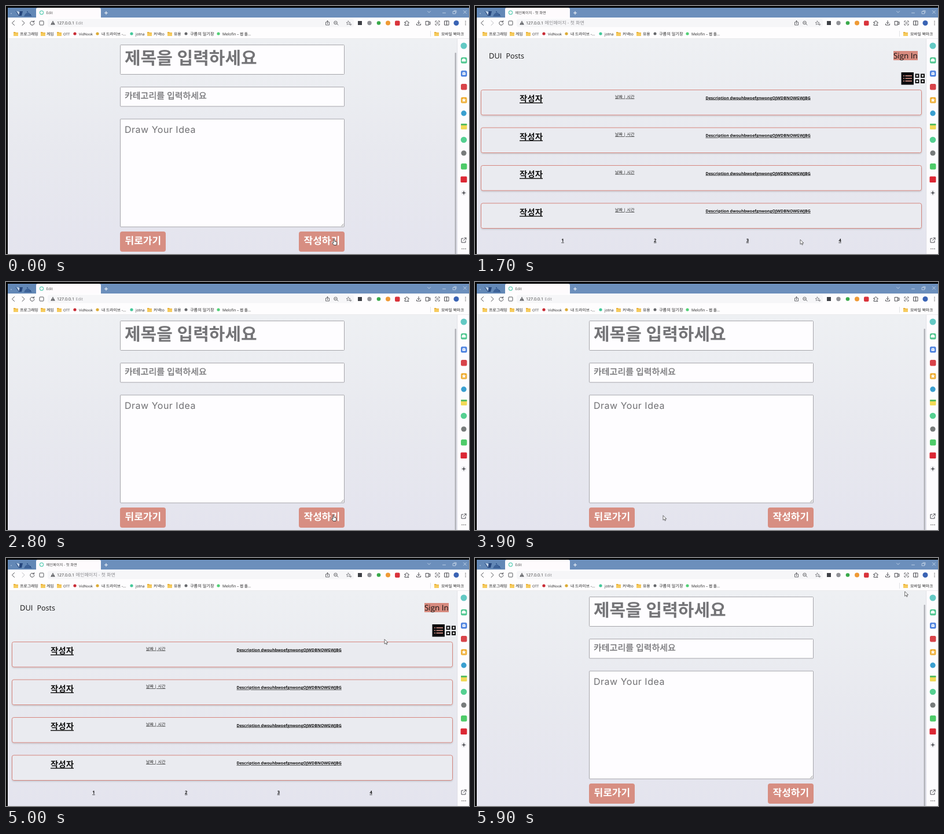
Write an HTML page that moves like this. It is 800 px wide and 430 px high and loops after 6 s.

```html
<!DOCTYPE html>
<html lang="ko">
<head>
<meta charset="utf-8">
<title>Edit</title>
<style>
html, body { margin: 0; width: 100%; height: 100%; overflow: hidden; background: #000; }
svg { display: block; width: 800px; height: 430px; }
text { font-family: "Open Sans", "Noto Sans CJK KR", "Noto Sans CJK", sans-serif; white-space: pre; text-rendering: geometricPrecision; }
.u { text-decoration: underline; }
.i { fill: none; stroke: #4a4b50; stroke-width: 1; stroke-linecap: round; stroke-linejoin: round; }
</style>
</head>
<body>
<svg id="stage" viewBox="0 0 800 430" xmlns="http://www.w3.org/2000/svg"></svg>
<script>
const rect = (x, y, w, h, fill, more = '') =>
  `<rect x="${x}" y="${y}" width="${w}" height="${h}" fill="${fill}" ${more}/>`;
const dot = (x, y, r, fill, more = '') => `<circle cx="${x}" cy="${y}" r="${r}" fill="${fill}" ${more}/>`;
const line = (d, more = '') => `<path class="i" d="${d}" ${more}/>`;
const text = (x, y, size, str, fill = '#222', more = '') =>
  `<text x="${x}" y="${y}" font-size="${size}" fill="${fill}" ${more}>${str}</text>`;
const folder = x => `<path d="M${x} 45h3l1 1h4v6h-8z" fill="#e9b23c"/>` + rect(x, 47, 8, 5, '#f6cb5e', 'rx=".6"');

const defs = `<defs>
  <linearGradient id="bg" x2="0" y2="1"><stop stop-color="#eef0f3"/><stop offset=".5" stop-color="#e8e9ef"/><stop offset="1" stop-color="#e4e4ee"/></linearGradient>
  <linearGradient id="fade"><stop offset=".88" stop-color="#555"/><stop offset="1" stop-color="#555" stop-opacity=".2"/></linearGradient>
  <clipPath id="tabClip"><rect x="68" y="3" width="91" height="17"/></clipPath>
  <filter id="soft" x="-2%" y="-10%" width="104%" height="140%"><feDropShadow dx="0" dy="1.5" stdDeviation="1.3" flood-opacity=".15"/></filter>
</defs>`;

function titleBar() {
  return rect(3, 3, 797, 18, '#6c8fbc') + rect(3, 3, 49, 17, '#6388b6') +
    '<path d="M16 8l6 5 1-4 6 0-2 8-5 0z" fill="#26477d"/><path d="M18 9l4.500 7 1-6z" fill="#c4d6ea"/>' +
    '<path d="M33 14q5-5 8-1l4 5h-14z" fill="#3d6298"/>' +
    dot(9, 13, .8, '#c8d8eb') + dot(37, 10, .9, '#284a80') + dot(42, 15, 1, '#284a80') +
    '<path d="M52 20V6q0-3 3-3h106q3 0 3 3v14z" fill="#fefbfd"/>' +
    line('M170.500 12h5M173 9.500v5', 'style="stroke:#fff"') +
    `<g opacity=".85">${line('M728.500 9l2.500 2.500 2.500-2.500M754.500 12h5M772.500 9.500h4v4h-4zM774 8h4v4M790.500 8l5 5m0-5l-5 5', 'style="stroke:#d5e1ee;stroke-width:.9"')}</g>`;
}

function toolbar() {
  return rect(3, 20, 797, 37, '#fefdfe') + rect(72, 22.500, 529, 14, '#f6f6f8', 'rx="3"') +
    line('M14.500 25.500l-4 4 4 4') +
    rect(58, 26, 7, 7, 'none', 'rx="1" stroke="#55565b"') +
    '<path d="M81 25.500l3.800 7h-7.600z" fill="#55565b"/>' + line('M81 28v2M81 31.200v.2', 'style="stroke:#fff;stroke-width:.8"') +
    text(88, 32.300, 7.1, '127.0.0.1', '#333') +
    line('M554 28h-1.500v5h6v-5H557M555.500 31v-5.500m-1.500 1.500l1.500-1.500 1.500 1.500', 'style="stroke-width:.8"') +
    line('M572 31l2 2M568.200 29h2.600', 'style="stroke-width:.8"') + dot(569.500, 29, 2.800, 'none', 'stroke="#4a4b50" stroke-width=".8"') +
    line('M591.500 26l1 2.300 2.500.2-1.900 1.600.6 2.400-2.200-1.300-2.200 1.300.6-2.400-1.900-1.600 2.500-.2zM594 32h3M595.500 30.500v3', 'style="stroke:#77787d;stroke-width:.8"') +
    rect(608, 26, 7, 7, '#3e4046') + dot(628, 29.500, 3.700, '#929398') + dot(644, 29.500, 3.300, '#39a94a') +
    dot(660, 29.500, 4, '#ef9a35') + rect(672, 25.500, 8.500, 8.500, '#d9333b', 'rx="2"') +
    line('M689 28h2q0-2.500 1.500-2.500T694 28h2v2q-2 0-2 1.500t2 1.500v.5h-7v-2q2 0 2-1.300t-2-1.200z', 'style="stroke-width:.9"') +
    line('M713 25.500v5m-2-2l2 2 2-2M709.500 31v2h7v-2') +
    line('M725.500 26.500h5v6.500h-5zM730.500 28.500l2.500-1v4.500l-2.500-1') +
    line('M742 28v-2h2M747 26h2v2M749 31v2h-2M744 33h-2v-2', 'style="stroke-width:.9"') + dot(745.500, 29.500, 1.500, 'none', 'stroke="#4a4b50" stroke-width=".8"') +
    line('M758 26h7v7h-7zM761.500 26v7') + dot(778, 29.500, 4.500, '#3a63b4') +
    [26.500, 29.500, 32.500].map(y => dot(794, y, .75, '#444')).join('');
}

function bookmarks() {
  const label = (x, size, s) => text(x, 50.500, size, s, '#222');
  return [13, 60, 88, 244, 279, 740].map(folder).join('') +
    label(24, 6.9, '프로그래밍') + label(70, 6.9, '게임') + label(99, 6, 'OTT') +
    dot(119, 48, 2.600, '#c92b35') + label(126, 6.1, 'VidNook') +
    dot(158, 48, 2.600, '#dcab35') + label(165, 6.8, '내 드라이브 -...') +
    dot(217, 48, 2.600, '#45c99a') + label(224, 6.5, 'jotna') +
    label(255, 6.7, '커넥to') + label(290, 6.8, '유용') +
    dot(311, 48, 2.500, '#66676b') + label(318, 7.2, '구름의 일기장') +
    dot(367, 48, 2.600, '#52d076') + label(374, 6.6, 'Melofin – 웹 플...') +
    rect(733, 43, .8, 10, '#dadade') + label(752, 6.8, '모바일 북마크') + rect(3, 56, 797, .7, '#e2e2e6');
}

function sidebar() {
  const tile = (y, c) => rect(786, y - 5, 10.500, 10.500, c, 'rx="2.500"');
  return rect(780, 57, 20, 373, '#fdfcfe') + rect(779.500, 57, .7, 373, '#dcdce2') +
    dot(791, 69, 5.500, '#63c9c4') + tile(94, '#4fc690') + tile(117, '#4a80df') + tile(140, '#d8434a') + tile(163, '#efb13e') +
    line('M788 95.500v-1.500q0-2.500 3-2.500t3 2.500v1.500z', 'style="stroke:#fff;fill:#fff"') +
    rect(788.500, 114.500, 5.500, 5, '#fff') + line('M788.500 115l2.800 2.200 2.700-2.200', 'style="stroke:#4a80df;stroke-width:.8"') +
    '<path d="M791.200 159.500l1.100 2.400 2.600.2-2 1.700.7 2.600-2.400-1.400-2.400 1.400.7-2.600-2-1.700 2.600-.2z" fill="#fff"/>' +
    dot(791, 186, 4.700, '#3a9fd0') +
    rect(786, 204, 10.500, 10, '#f1d956', 'rx="1.500"') + rect(786, 204, 10.500, 3, '#58bd63', 'rx="1"') +
    dot(791, 232, 5.300, '#55d091') + dot(791, 255, 4.600, '#777b7b') + tile(278, '#4ecb69') +
    rect(785.500, 295.500, 11, 10.500, '#dc2734', 'rx="1.500"') +
    dot(791, 324, 5, '#f1f0f3') + '<path d="M791 320l1 3 3 1-3 1-1 3-1-3-3-1 3-1z" fill="#55565b"/>' +
    line('M790 403h-3v7h7v-3M790.500 406.500l4.500-4.500m-3 0h3v3') +
    [788, 791, 794].map(x => dot(x, 421, .8, '#444')).join('');
}

function editPage() {
  const box = (y, h) => rect(197.500, y, 387, h, '#fefdff', 'rx="1" stroke="#a5a5aa"');
  const button = (x, s) => rect(x, 391, 79, 35, '#d78e82', 'rx="4"') + text(x + 8.500, 413.300, 17, s, '#fff', 'font-weight="700"');
  return box(67.500, 51) + text(205, 100.500, 30, '제목을 입력하세요', '#747477', 'font-weight="700"') +
    box(140.500, 33.500) + text(205, 161, 15, '카테고리를 입력하세요', '#707073', 'stroke="#707073" stroke-width=".3"') +
    box(196, 187) + text(205, 219.800, 16, 'Draw Your Idea', '#707073', 'style="font-family:Inter,sans-serif;letter-spacing:.5px"') +
    line('M579.500 381.500l3.500-3.500M582 381.500l1-1', 'style="stroke:#666;stroke-width:.7"') +
    button(197, '뒤로가기') + button(506, '작성하기') + rect(775.500, 81, 2.500, 349, '#b3b4ba', 'rx="1"');
}

function mainPage() {
  const row = i => {
    const y = 145.500 + i * 65.500;
    return rect(10.500, y, 761, 43.500, '#eaebf0', 'rx="3" stroke="#d47c72" stroke-width=".9" filter="url(#soft)"') +
      text(77, y + 20.800, 14.500, '작성자', '#111', 'class="u" font-weight="700"') +
      text(242, y + 14, 7.050, '날짜 | 시간', '#222', 'class="u"') +
      text(398.500, y + 16, 7, 'Description dwouhbwoefgnwongOJWDBNOWGWJBG', '#111', 'class="u" font-weight="700"');
  };
  const list = [121, 125.500, 130].map(y =>
    rect(740, y - .7, 1.800, 1.600, '#e39a8e') + rect(743.500, y - .7, 11.500, 1.600, '#e39a8e')).join('');
  const grid = [761.500, 771].map(x => [118.500, 128].map(y =>
    rect(x, y, 5, 5, 'none', 'stroke="#111" stroke-width="2"')).join('')).join('');
  return text(24, 91.300, 12.900, 'DUI', '#111') + text(53.500, 91.300, 12.500, 'Posts', '#111') +
    rect(723, 78, 42, 16, '#d78b7f') + text(723, 91.300, 13.400, 'Sign In', '#111') +
    rect(736.500, 115, 21.500, 21.500, '#0c0c0e') + list + grid +
    [0, 1, 2, 3].map(row).join('') +
    [1, 2, 3, 4].map(n => text(151.500 + (n - 1) * 159.700, 409, 7.600, n, '#111',
      'class="u" font-weight="700" text-anchor="middle"')).join('');
}

const stage = document.getElementById('stage');
stage.innerHTML = defs + rect(0, 0, 800, 430, '#000') + rect(3, 57, 777, 373, 'url(#bg)') +
  `<g id="edit">${editPage()}</g><g id="main">${mainPage()}</g>` +
  titleBar() + toolbar() + bookmarks() + sidebar() +
  `<g id="idle">${dot(61.500, 11.500, 3.100, 'none', 'stroke="#5fcfb6" stroke-width="1.200"')}
    ${line('M48 27.500a3.500 3.500 0 1 0 .8 2.500M48.500 25.500v2.300h-2.300')}</g>
  <g id="busy">${dot(0, 11.500, 1.200, '#b4a0ba', 'id="spin"')}${line('M42.500 26.500l6 6m0-6l-6 6')}</g>
  ${line('M28 25.500l4 4-4 4', 'id="next"')}
  <g clip-path="url(#tabClip)">${text(69.500, 13.800, 6, '', '#555', 'id="tab"')}</g>
  ${text(120.500, 32.300, 7.100, '', '#8c8c90', 'id="url"')}
  <path id="arrow" d="M0 0V8.200L2 6.500 3.300 9.300 4.500 8.700 3.300 6H5.900Z" fill="#fff" stroke="#333" stroke-width=".7"/>
  <path id="hand" d="M0 .8Q0-.2.9-.2T1.800.8V4L5 4.700Q5.800 5 5.700 6L5 10.500H.3L-2.200 6.800Q-2.300 5.600-1 6L0 7Z" fill="#fff" stroke="#222" stroke-width=".8"/>`;

const el = {};
stage.querySelectorAll('[id]').forEach(n => el[n.id] = n);

const PATH = '127.0.0.1:5500/duiProject/index.html', HOME = '메인페이지 - 첫 화면';
// start, page, loading, title
const states = [
  [0, 'edit', false, 'Edit'], [900, 'edit', true, 'Edit'],
  [1100, 'main', true, PATH], [1300, 'main', false, HOME], [2200, 'main', true, HOME],
  [2400, 'edit', false, 'Edit'], [4200, 'edit', true, 'Edit'],
  [4300, 'main', true, PATH], [4500, 'main', false, HOME], [5200, 'main', true, HOME],
  [5400, 'edit', false, 'Edit']
];
// time, pointer tip x, y
const moves = [
  [0, 566, 404], [800, 566, 404], [1000, 562, 405], [1700, 562, 405], [2100, 738, 88], [2300, 738, 88],
  [2800, 565, 404], [3600, 565, 404], [4000, 245, 405], [4500, 244, 405], [5100, 736, 88],
  [5300, 717, 94], [5700, 740, 62], [6000, 744, 56]
];
const links = {
  edit: [[197, 391, 79, 35], [506, 391, 79, 35]],
  main: [[723, 78, 42, 16]]
};

function pointer(t) {
  const i = moves.findIndex(m => m[0] > t);
  const [t0, x0, y0] = moves[i - 1], [t1, x1, y1] = moves[i];
  const k = (t - t0) / (t1 - t0);
  return [x0 + (x1 - x0) * k, y0 + (y1 - y0) * k];
}

const show = (node, on) => node.setAttribute('visibility', on ? 'visible' : 'hidden');

function draw(t) {
  const [, page, busy, title] = states.filter(s => s[0] <= t).pop();
  const [x, y] = pointer(t);
  const over = !busy && links[page].some(([a, b, w, h]) => x >= a && x <= a + w && y >= b && y <= b + h);
  show(el.edit, page === 'edit');
  show(el.main, page === 'main');
  show(el.idle, !busy);
  show(el.busy, busy);
  el.spin.setAttribute('cx', 59 + (t / 100 % 2) * 4);
  el.next.style.stroke = page === 'main' ? '#b9b9be' : '#4a4b50';
  el.tab.textContent = el.url.textContent = title;
  el.tab.setAttribute('fill', title === PATH ? 'url(#fade)' : '#444');
  el.tab.setAttribute('font-size', title === PATH ? 6 : 6.3);
  el.url.setAttribute('font-size', title === HOME ? 8.1 : 7.1);
  show(el.hand, over);
  show(el.arrow, !over);
  (over ? el.hand : el.arrow).setAttribute('transform', `translate(${x} ${y})`);
}

function tick() {
  draw(Math.floor(performance.now() % 6000 / 100) * 100);
  requestAnimationFrame(tick);
}
tick();
</script>
</body>
</html>
```
